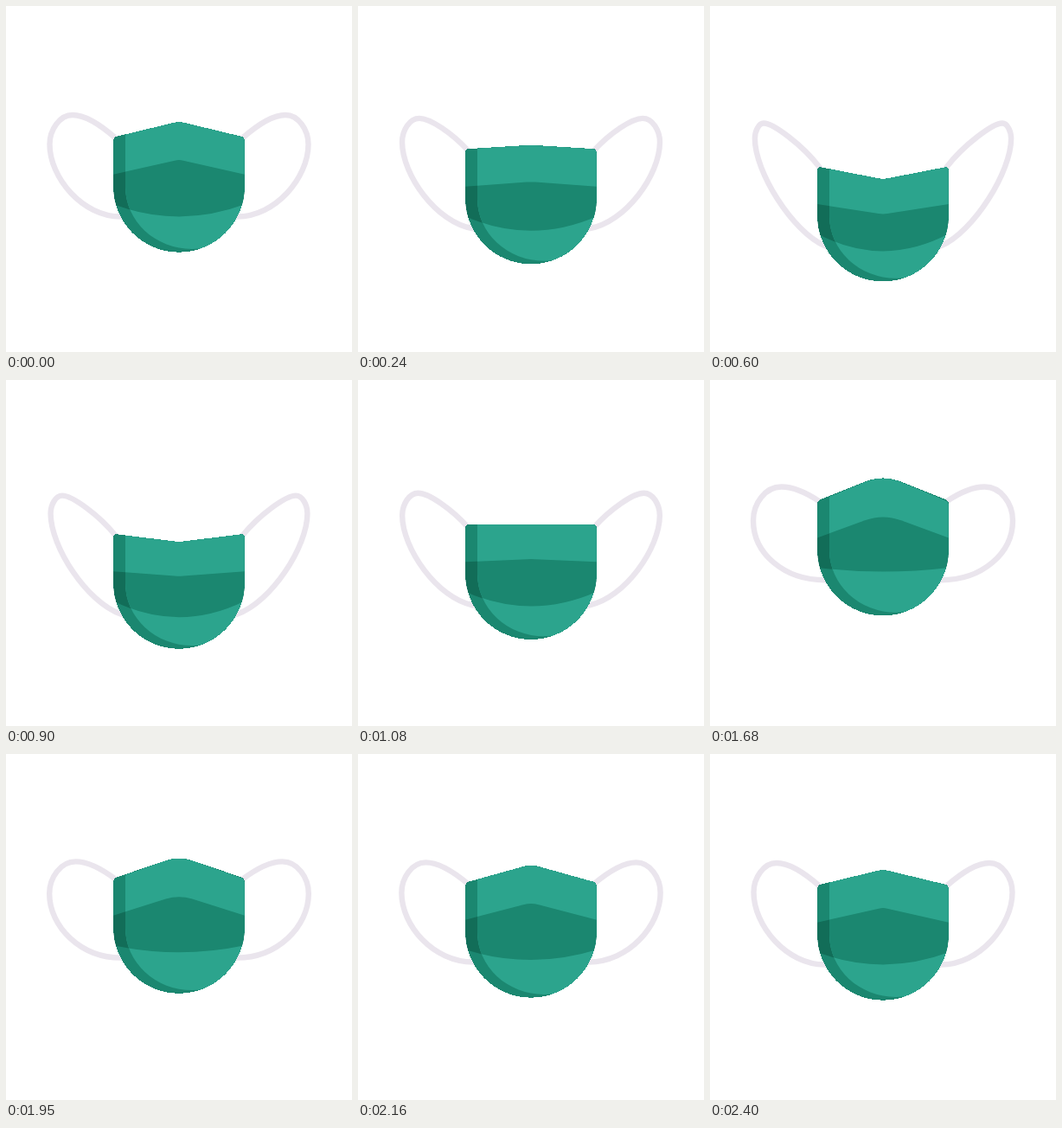
An HTML page that plays this animation: 400x400 px, repeating every 4.43 s.

```html
<!DOCTYPE html>
<html lang="en">
<head>
<meta charset="utf-8">
<title>Breathing mask</title>
<style>
  html, body { margin: 0; width: 100%; height: 100%; overflow: hidden; background: #fff; }
  svg { display: block; width: 100%; height: 100%; }
  .crisp { shape-rendering: crispEdges; }
</style>
</head>
<body>
<svg viewBox="0 0 400 400">
  <defs>
    <clipPath id="bodyClip"><path id="bodyEdge" class="crisp"/></clipPath>
    <clipPath id="frontClip"><path id="frontEdge"/></clipPath>
    <path id="strap" fill="none" stroke="#eae5ed" stroke-width="6.4" stroke-linecap="round"/>
    <path id="band"/>
  </defs>
  <use href="#strap"/>
  <use href="#strap" transform="matrix(-1 0 0 1 400 0)"/>
  <path id="body" class="crisp" fill="#1b8770"/>
  <g clip-path="url(#bodyClip)">
    <use href="#band" fill="#126d58"/>
    <g clip-path="url(#frontClip)">
      <path id="light" class="crisp" fill="#2ca48d"/>
      <use href="#band" fill="#1b8770"/>
    </g>
  </g>
</svg>
<script>
const LOOP = 4430, STEP = 30;
const BEND = 1.97; // how far the top point moves per unit of body shift

// time, body shift, top point shift, body speed
const KEYS = [
  [0, 0, 0, 0],
  [240, 13.7, 27.2, 0.075],
  [630, 34, 67.2, 0],
  [1080, 15.3, 33.6, -0.065],
  [1650, -12.3, -24.2, 0],
  [2160, -3, -5.9, 0.02],
  [2400, 0, 0, 0]
];

const el = id => document.getElementById(id);
const set = (id, d) => el(id).setAttribute("d", d);

function poseAt(t) {
  const i = KEYS.findIndex(k => k[0] > t);
  if (i < 0) return [0, 0];
  const [t0, s0, p0, v0] = KEYS[i - 1], [t1, s1, p1, v1] = KEYS[i];
  const h = t1 - t0, u = (t - t0) / h, w = 1 - u;
  const bow = h * u * w * (v0 * w - v1 * u);
  const mix = (a, b) => a * w * w * (1 + 2 * u) + b * u * u * (3 - 2 * u);
  return [mix(s0, s1) + bow, mix(p0, p1) + bow * BEND];
}

// Two slopes meeting in a softened point at the centre line
function ridge(half, side, apex, soft) {
  const y = apex + (side - apex) * soft / half;
  return `L${200 - soft} ${y}Q200 ${apex} ${200 + soft} ${y}`;
}

function bodyPath(s, w, apex, soft, drop = 0) {
  const l = 200 - w, r = 200 + w, c = 151.7 + s + drop, mid = 209 + s;
  const y = c + (apex - c) * 4 / w;
  return `M${l} ${c + 4}Q${l} ${c} ${l + 4} ${y}` + ridge(w, c, apex, soft) +
    `L${r - 4} ${y}Q${r} ${c} ${r} ${c + 4}V${mid}A${w} 75.7 0 0 1 ${l} ${mid}Z`;
}

function bandPath(s, p, soft) {
  const side = 195 + s, low = 229 + s;
  const mid = 243.5 + s * (s > 0 ? 1.18 : 1.8);
  return `M123 ${side}` + ridge(77, side, 177.5 + 1.4 * s + 0.24 * p, soft) +
    `L277 ${side}V${low}Q200 ${2 * mid - low} 123 ${low}Z`;
}

function strapPath(s) {
  const tx = 77 - 0.44 * s, ty = 126 + s * (s > 0 ? 0.28 : 0.2);
  const lx = 50.5 + 0.04 * s, ly = 160 - 0.2 * s, ey = 243.5 + s;
  return `M127 ${153 + s}` +
    `C${110 - 0.1 * s} ${138 + 0.65 * s} ${tx + 14 - 0.1 * s} ${ty} ${tx} ${ty}` +
    `C${tx - 15 + 0.27 * s} ${ty} ${lx} ${ly - 17 + 0.25 * s} ${lx} ${ly}` +
    `C${lx} ${ly + 38} ${88 + 0.2 * s} ${ey - Math.max(0, s) * 0.5} 133 ${ey}`;
}

function draw([s, p]) {
  const up = Math.max(0, -s);
  const apex = 133.4 + p, soft = 5 + 1.3 * up;
  const body = bodyPath(s, 75.8, apex, soft);
  set("body", body);
  set("bodyEdge", body);
  set("light", bodyPath(s, 75.8, apex, soft, Math.max(0, up - 3) * 0.15));
  set("frontEdge", `M138 90H290V400H224V${280.6 + s}L215 ${281 + s}A77 72 0 0 1 138 ${209 + s}Z`);
  set("band", bandPath(s, p, soft));
  set("strap", strapPath(p / BEND));
}

const start = performance.now();
function tick() {
  const t = (performance.now() - start) % LOOP;
  draw(poseAt(Math.floor(t / STEP) * STEP));
  requestAnimationFrame(tick);
}
tick();
</script>
</body>
</html>
```
